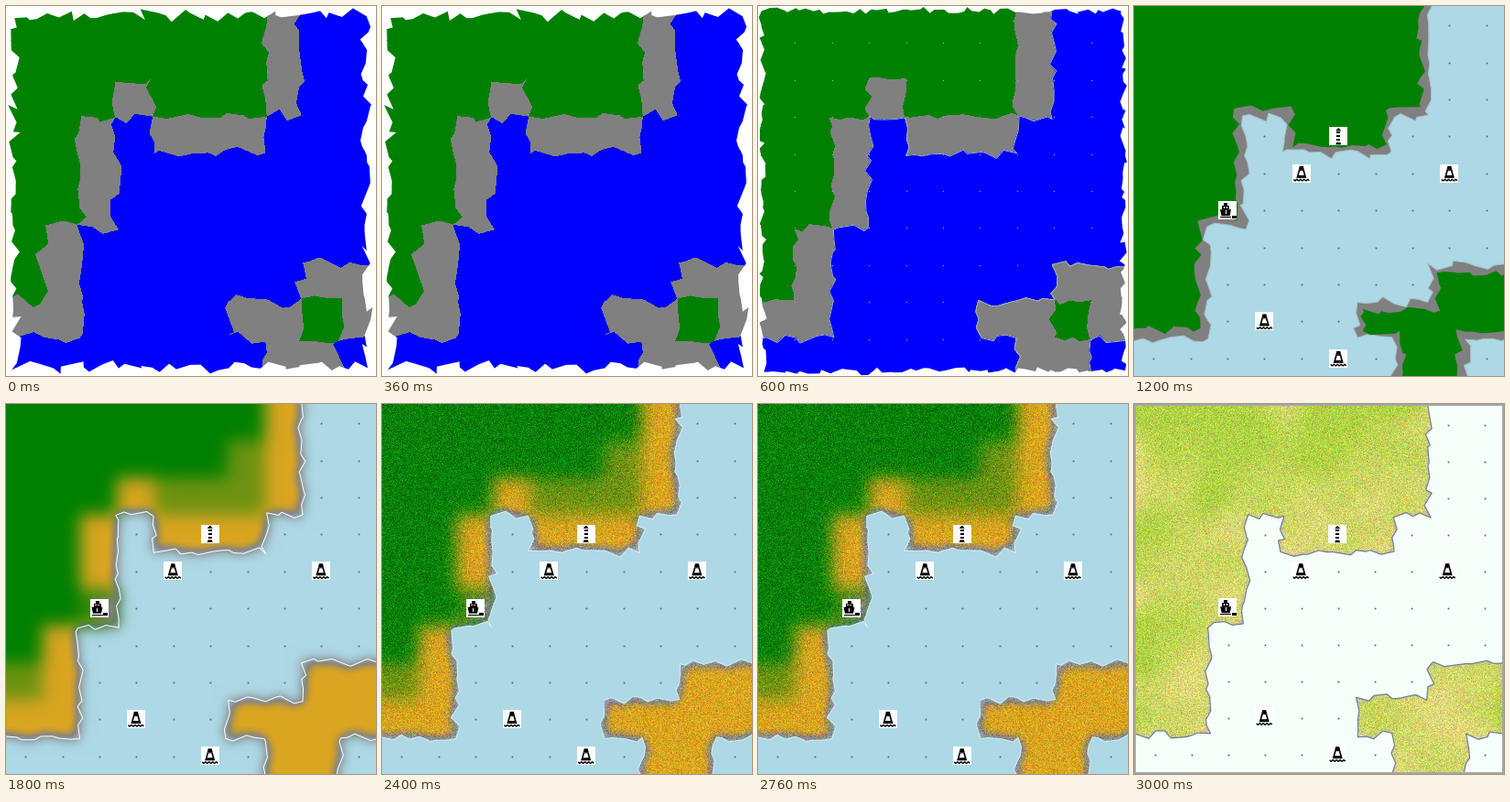
These frames come from a looping animation (404 px wide and 404 px high, 3600 ms). A matplotlib script:

```python
import numpy as np
import matplotlib.pyplot as plt
from matplotlib.animation import ArtistAnimation
from matplotlib.patches import Polygon, Rectangle
from matplotlib.path import Path

SIZE = 404
DPI = 100
PX = 72 / DPI
CELL = 40.4

# F forest, o scrub, h hill, p port, s shore, w water
TILES = [
    "FFFFFFFsww",
    "FFFFFFoswW".lower().replace("f", "F"),
    "FFFsooosww",
    "FFswssswww",
    "FFswwwwwww",
    "FFpwwwwwww",
    "Fswwwwwwww",
    "oswwwwwwss",
    "sswwwwsshs",
    "wwwwwwwssw",
]
FLAT = dict(F="green", o="green", h="green", p="gray", s="gray", w="blue")
WOOD = dict(F=1.0, o=0.5, p=0.75)

# corners in cells, with the land on the right-hand side of the walk
MAINLAND = [(8, -1), (8, 3), (7, 3), (7, 4), (4, 4), (4, 3), (3, 3), (3, 6),
            (2, 6), (2, 9), (-1, 9), (-1, -1)]
ISLAND = [(11, 9), (9, 9), (9, 11), (7, 11), (7, 9), (6, 9), (6, 8), (8, 8), (8, 7), (11, 7)]
STAGE = [(10, 0), (10, 10), (0, 10), (0, 0)]

WATER, GRAY, GREEN, GOLD, MINT, SAND, KHAKI, LIME = np.array([
    (173, 216, 230), (128, 128, 128), (0, 128, 0), (218, 165, 32),
    (245, 255, 250), (200, 192, 165), (226, 218, 122), (178, 211, 70)]) / 255

fig = plt.figure(figsize=(SIZE / DPI, SIZE / DPI), dpi=DPI, facecolor="white")
ax = fig.add_axes([0, 0, 1, 1])
ax.axis("off")
ys, xs = np.mgrid[0:SIZE, 0:SIZE] + 0.5
GRID = np.column_stack([xs.ravel(), ys.ravel()])


# ---------- rough outlines ----------
def noise(seed, amp, count, *points):
    """Random shifts that depend only on the seed and the given points."""
    key = [seed] + [int(round(100 * (c + 5))) for p in points for c in p]
    return np.random.default_rng(key).uniform(-amp, amp, (count, 2))


def rough_edge(a, b, seed, amp, n):
    """Jagged line from a towards b, the same whichever way it is walked."""
    lo, hi = sorted([tuple(np.round(a, 4)), tuple(np.round(b, 4))])
    t = np.arange(n + 1)[:, None] / n
    line = np.array(lo) * (1 - t) + np.array(hi) * t
    line[1:-1] += noise(seed, amp, n - 1, lo, hi)
    line[0] += noise(seed, amp / 2, 1, lo)[0]
    line[-1] += noise(seed, amp / 2, 1, hi)[0]
    return line[:-1] if lo == tuple(np.round(a, 4)) else line[:0:-1]


def rough(loop, seed, amp, n):
    """Jagged closed outline in pixels, built from edges about one cell long."""
    loop = np.array(loop, float)
    parts = []
    for a, b in zip(loop, np.roll(loop, -1, axis=0)):
        steps = max(1, int(round(np.hypot(*(b - a)))))
        stops = np.linspace(a, b, steps + 1)
        parts += [rough_edge(p, q, seed, amp, n) for p, q in zip(stops, stops[1:])]
    return np.vstack(parts) * CELL


def inset(loop, d):
    """Move every side of a right-angled outline inwards by d cells."""
    loop = np.array(loop, float)
    step = np.roll(loop, -1, axis=0) - loop
    step /= np.hypot(*step.T)[:, None]
    normal = np.column_stack([-step[:, 1], step[:, 0]])
    return loop + d * (normal + np.roll(normal, 1, axis=0))


def shores(seed, amp, n=4):
    return [rough(loop, seed, amp, n) for loop in (MAINLAND, ISLAND)]


# ---------- fields ----------
def mask(polys):
    hit = np.zeros(SIZE * SIZE, bool)
    for p in polys:
        hit |= Path(p).contains_points(GRID)
    return hit.reshape(SIZE, SIZE).astype(float)


def blur(field, sigma):
    r = int(3 * sigma)
    k = np.exp(-0.5 * (np.arange(-r, r + 1) / sigma) ** 2)
    k /= k.sum()
    for _ in range(2):
        wide = np.pad(field, ((0, 0), (r, r)), mode="edge")
        field = np.array([np.convolve(row, k, "valid") for row in wide]).T
    return field


def mix(a, b, w):
    return a + (b - a) * np.clip(w, 0, 1)[..., None]


def wood(sigma):
    level = np.array([[WOOD.get(t, 0) for t in row] for row in TILES])
    return blur(level[(ys // CELL).astype(int), (xs // CELL).astype(int)], sigma)


def canvas(color):
    return np.ones((SIZE, SIZE, 3)) * color


def terrain(land):
    """Grey shore, golden lowland and green inland, softly blended."""
    img = mix(canvas(WATER), GRAY, blur(land, 6) * 1.35)
    img = mix(img, GOLD, (blur(land, 7) - 0.62) / 0.34)
    img = mix(img, GREEN, wood(9))
    harbour = np.exp(-((xs - 113) ** 2 + (ys - 224) ** 2) / 200)
    return mix(img, GRAY, harbour * blur(land, 3))


# ---------- artist helpers ----------
def poly(p, color, z=1, edge="none", lw=0.0, aa=True, clip=None):
    shape = ax.add_patch(Polygon(p, closed=True, fc=color, ec=edge, lw=lw * PX,
                                 zorder=z, antialiased=aa))
    if clip is not None:
        shape.set_clip_path(clip)
    return shape


def box(x, y, w, h, color, z=1):
    return ax.add_patch(Rectangle((x, y), w, h, fc=color, ec="none", zorder=z))


def picture(img):
    return ax.imshow(np.clip(img, 0, 1), extent=(0, SIZE, SIZE, 0),
                     interpolation="nearest", aspect="auto", zorder=1)


def outlines(polys, color, lw=1.0, clip=None):
    return [poly(p, "none", 3, color, lw, clip=clip) for p in polys]


def dots(start, step, count, color, land=None, size=1.8):
    g = start + step * np.arange(count)
    spots = [(x, y) for x in g for y in g
             if land is None or not land[int(y), int(x)]]
    return ax.plot(*np.transpose(spots), "s", ms=size * PX, mew=0, color=color, zorder=4)


# ---------- chart symbols ----------
def taper(x, y, top, bottom, y0, y1, color, z):
    corners = [(x - top, y + y0), (x + top, y + y0), (x + bottom, y + y1), (x - bottom, y + y1)]
    return poly(corners, color, z)


def buoy(x, y):
    wave = np.linspace(-8, 8, 33)
    return [
        box(x - 10, y - 10, 20, 20, "white", 5),
        taper(x, y, 2, 3, -8, -4, "black", 6),
        taper(x, y, 3, 5.5, -4, 5, "black", 6),
        taper(x, y, 1.5, 3, -3, 2, "white", 7),
        *ax.plot(x + wave, y + 7.3 + 0.8 * np.sin(wave * 1.6), color="black",
                 lw=1.4 * PX, zorder=6),
    ]


def lighthouse(x, y):
    bands = [box(x - 2, y + dy, 4, 2, "black", 6) for dy in (-5, -1, 3)]
    return bands + [
        box(x - 10, y - 10, 20, 20, "white", 5),
        taper(x, y, 0.5, 3, -9, -6, "black", 6),
        taper(x, y, 2, 3, 6.5, 9, "black", 6),
    ]


def ship(x, y):
    windows = [box(x + dx, y - 4, 1.5, 1.5, "white", 7) for dx in (-4.5, -1.5)]
    return windows + [
        box(x - 10, y - 10, 20, 20, "white", 5),
        box(x - 4, y - 8, 4, 3, "black", 6),
        box(x - 6, y - 5, 8, 4, "black", 6),
        taper(x - 2, y, 6, 4.5, -1, 6, "black", 6),
        box(x - 2.5, y, 1, 4, "white", 7),
        box(x - 8, y + 7, 12, 1.2, "black", 6),
        box(x + 4.5, y + 5.5, 5, 3, "black", 6),
    ]


def symbols(scale=1.0, shift=0.0):
    def at(col, row):
        return [(c + 0.5) * CELL * scale + shift for c in (col, row)]

    out = lighthouse(*at(5, 3)) + ship(*at(2, 5))
    for spot in ((4, 4), (8, 4), (3, 8), (5, 9)):
        out += buoy(*at(*spot))
    return out


# ---------- scenes ----------
def cell_scene(seed, amp, n, margin, spike, spikes):
    """Coloured cells inside a ragged white margin."""
    frame = poly(rough(inset(STAGE, margin), seed, spike, spikes), "none")
    out = [frame]
    for row in range(-1, 11):
        for col in range(-1, 11):
            tile = TILES[min(max(row, 0), 9)][min(max(col, 0), 9)]
            square = [(col, row), (col + 1, row), (col + 1, row + 1), (col, row + 1)]
            out.append(poly(rough(square, seed, amp, n), FLAT[tile], 2, aa=False, clip=frame))
    return out


def grid_scene():
    seed, amp, n = 4, 0.12, 4
    out = cell_scene(seed, amp, n, 0.13, 0.11, 6)
    out += outlines(shores(seed, amp, n), "#9fb0b0", 1, clip=out[0])
    return out + dots(CELL, CELL, 9, "#8fae9f", size=1.2)


def flat_scene():
    coast = shores(2, 0.14)
    inland = [rough(inset(loop, 0.24), 3, 0.13, 4) for loop in (MAINLAND, ISLAND)]
    out = [box(0, 0, SIZE, SIZE, WATER, 0)]
    out += [poly(p, GRAY, 1, "#a9c0c4", 1) for p in coast]
    out += [poly(p, GREEN, 2) for p in inland]
    return out + dots(21.2, CELL, 10, "dimgray", mask(coast)) + symbols(shift=1)


def terrain_scene(seed, amp, grain, line):
    coast = shores(seed, amp)
    land = mask(coast)
    img = terrain(land)
    if grain:
        img += np.random.default_rng(seed).normal(0, grain, img.shape)
        img = mix(canvas(WATER), img, land)
    return ([picture(img)] + outlines(coast, line)
            + dots(21.2, CELL, 10, "dimgray", land) + symbols(shift=0.5))


def pale_scene():
    coast = [p * 0.99 + 2.2 for p in shores(10, 0.14)]
    land = mask(coast)
    rng = np.random.default_rng(12)
    patches = blur(rng.normal(0, 1, land.shape), 16) * 10
    img = mix(canvas(KHAKI), LIME, wood(25) * 0.6 + 0.25 + patches)
    img = mix(img, SAND, (0.85 - blur(land, 5)) * 1.6)
    img += rng.normal(0, 0.085, img.shape)
    img = mix(canvas(MINT), img, land)
    border = ax.add_patch(Rectangle((1, 1), SIZE - 2, SIZE - 2, fc="none", ec="#a6a6a6",
                                    lw=2 * PX, zorder=8))
    return ([picture(img), border] + outlines(coast, "slategray", 1.2)
            + dots(23.2, 40, 10, "dimgray", land) + symbols(0.99, 2.2))


scenes = [
    cell_scene(seed=7, amp=0.2, n=3, margin=0.24, spike=0.19, spikes=4),
    grid_scene(),
    flat_scene(),
    terrain_scene(seed=5, amp=0.12, grain=0, line="white"),
    terrain_scene(seed=8, amp=0.14, grain=0.085, line="#dfe9ec"),
    pale_scene(),
]
ax.set_xlim(0, SIZE)
ax.set_ylim(SIZE, 0)
anim = ArtistAnimation(fig, scenes, interval=600, repeat=True, repeat_delay=0, blit=False)
plt.show()
```
